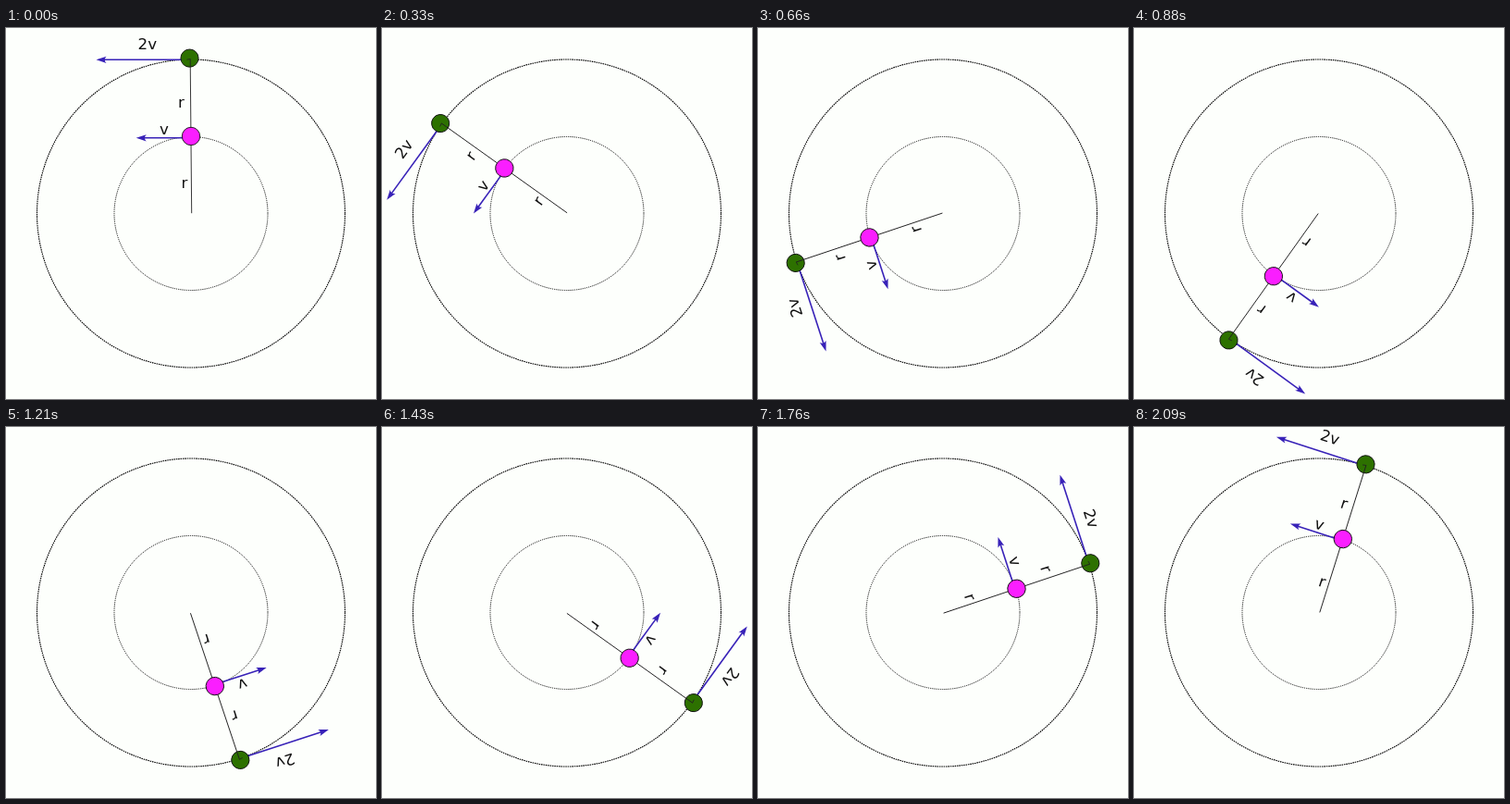
Animation, 400 px wide and 401 px high, one loop 2.2 s. Source, as an HTML page with a canvas:

```html
<!DOCTYPE html>
<html lang="en">
<head>
<meta charset="utf-8">
<title>Rotating radius</title>
<style>
  html, body { margin: 0; width: 100%; height: 100%; overflow: hidden; background: #fdfffc; }
  canvas { display: block; }
</style>
</head>
<body>
<canvas id="stage" width="400" height="401"></canvas>
<script>
const ctx = document.getElementById('stage').getContext('2d');
const STEP = 110, STEPS = 20;
const CX = 200, CY = 200.6;
const BLUE = '#3822b8';

function orbit(r, width, dash) {
  ctx.beginPath();
  ctx.arc(200, 200.5, r, 0, Math.PI * 2);
  ctx.setLineDash(dash);
  ctx.lineWidth = width;
  ctx.strokeStyle = '#000';
  ctx.stroke();
  ctx.setLineDash([]);
}

function line(x1, y1, x2, y2, color, width) {
  ctx.beginPath();
  ctx.moveTo(x1, y1);
  ctx.lineTo(x2, y2);
  ctx.strokeStyle = color;
  ctx.lineWidth = width;
  ctx.stroke();
}

function ball(x, y, r, color) {
  ctx.beginPath();
  ctx.arc(x, y, r, 0, Math.PI * 2);
  ctx.fillStyle = color;
  ctx.fill();
  ctx.strokeStyle = '#111';
  ctx.lineWidth = 0.9;
  ctx.stroke();
}

// Arrow pointing left, with a notched head
function arrow(tail, tip, y) {
  line(tail, y, tip + 7, y, BLUE, 1.6);
  ctx.beginPath();
  ctx.moveTo(tip, y);
  ctx.lineTo(tip + 11, y - 3.6);
  ctx.quadraticCurveTo(tip + 7.5, y, tip + 11, y + 3.6);
  ctx.closePath();
  ctx.fillStyle = BLUE;
  ctx.fill();
}

function label(text, x, y) {
  ctx.fillStyle = '#111';
  ctx.fillText(text, x, y);
}

function draw(time) {
  const step = Math.floor(time / STEP) % STEPS;

  ctx.fillStyle = '#fdfffc';
  ctx.fillRect(0, 0, 400, 401);
  orbit(166.5, 1.1, [1.6, 0.8]);
  orbit(83, 0.9, [1.2, 1]);

  ctx.save();
  ctx.translate(CX, CY);
  ctx.rotate(-step * Math.PI * 2 / STEPS);
  ctx.font = '16.7px "DejaVu Sans", sans-serif';
  ctx.textAlign = 'center';

  arrow(-6, -102.5, -166.3);
  arrow(-6, -59.3, -81.8);
  ball(-1.5, -168, 9.6, '#2d7100');
  line(-0.8, -167.3, 0.7, -0.4, '#222', 0.9);
  line(-0.8, -167.1, -4.5, -166.4, '#222', 0.8);
  ball(0, -83.6, 9.7, '#fa1eff');

  label('2v', -47.2, -178);
  label('v', -29, -85.4);
  label('r', -10.5, -115);
  label('r', -7.1, -27.3);
  ctx.restore();
}

function tick() {
  draw(performance.now());
  requestAnimationFrame(tick);
}
tick();
</script>
</body>
</html>
```
